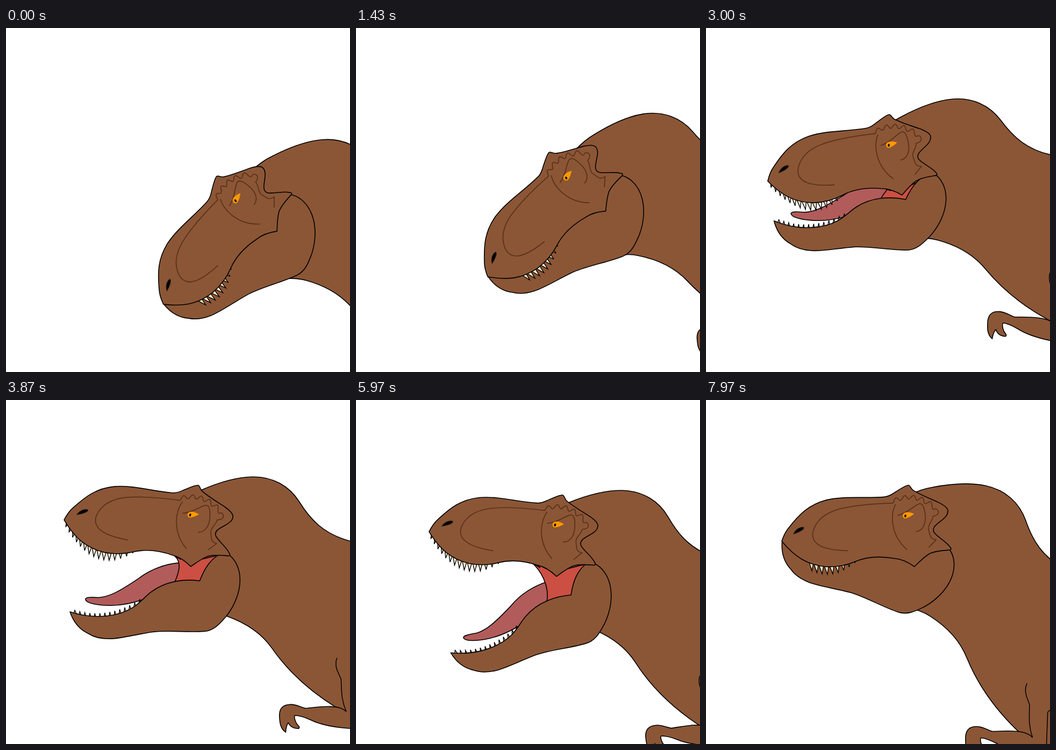
Animation of 640x640 px, one loop 8 s. Source, as an HTML page:

```html
<!DOCTYPE html>
<html lang="en">
<head>
<meta charset="utf-8">
<title>Roaring dinosaur</title>
<style>
html, body { margin: 0; width: 100%; height: 100%; overflow: hidden; background: #fff; }
svg { display: block; width: 100%; height: 100%; }
.skin { fill: #8b5636; stroke: #000; stroke-width: 1.6; stroke-linejoin: round; }
.ink { fill: none; stroke: #000; stroke-width: 1.5; }
.fold { fill: none; stroke: #59301a; stroke-width: 1.7; stroke-linejoin: round; }
.tooth { fill: #fdf0cf; stroke: #000; stroke-width: 1.4; }
.tongue { fill: #b25b5b; stroke: #000; stroke-width: 1.6; }
.throat { fill: #cc4f43; stroke: #000; stroke-width: 1.6; }
</style>
</head>
<body>
<svg viewBox="0 0 640 640">
  <g id="body">
    <path class="skin" d="M326,189C342,177 352,171 365,166C398,152 430,142 462,142C500,142 530,160 548,189
      C568,222 592,249 640,263C690,277 760,300 820,330L820,700L720,640C690,606 645,592 613,573
      C545,530 510,484 495,462C478,437 450,415 412,401C400,396 388,395 370,394Z"/>
    <g id="arm">
      <path class="skin" d="M636,581C628,574 618,573 606,573C590,573 575,576 560,578C550,576 542,571 531,572
        C518,573 512,580 512,592C513,605 514,617 525,624C525,617 526,611 529,606C533,613 540,617 549,616
        C552,612 547,611 544,606C541,601 539,594 541,592C550,592 560,595 570,599C590,608 615,611 640,612L740,616"/>
      <path class="ink" d="M615,482C612,490 613,500 619,511L624,521C626,545 626,560 636,581M666,524L659,531L664,600"/>
    </g>
    <g id="head">
      <path id="tongue" class="tongue" d="M325,301C300,303 272,312 250,329C215,352 195,363 175,364
        C160,363 150,363 150,367C151,374 172,379 198,379C225,379 248,373 275,362L330,340Z"/>
      <path id="throat" class="throat"/>
      <path id="front" class="tooth"/>
      <g id="jaw">
        <path id="lower" class="tooth"/>
        <path class="skin" d="M121,390C128,412 140,424 155,431C167,439 180,441 195,441C215,441 245,433 275,429
          C305,426 340,431 370,429C390,428 402,412 412,401C428,381 438,356 438,333C438,312 429,296 419,288
          L410,282C385,290 372,312 363,335C335,331 300,334 272,355C262,362 255,372 240,382C215,398 170,407 121,390Z"/>
      </g>
      <path id="back" class="tooth"/>
      <path class="skin" d="M111,223C117,211 121,206 128,200C150,180 170,164 205,160.5C240,158 275,169 312,172
        C322,173 328,169 335,166C345,162 358,156 361,158C364,160 363,163 367,168C378,178 395,188 410,198
        C420,205 426,212 425,217C424,224 418,228 409,233C398,239 391,243 393,251C396,260 412,271 418,283
        C420,287 421,288 417,289C405,288 390,286 378,290C366,295 357,302 347,309C336,298 325,291 313,288
        C290,280 265,276 240,282C220,287 200,286 185,283C150,274 130,255 111,223Z"/>
      <path class="fold" d="M327,186C290,181 255,178 225,181C200,184 180,195 171,215C163,238 185,252 230,260"/>
      <path class="fold" d="M331,189C318,205 312,245 339,276"/>
      <path class="fold" d="M331,210C350,209 362,198 374,195C382,194 383,205 382,220C380,238 370,246 360,245"/>
      <path class="fold" d="M404,209C411,216 406,222 396,222C394,231 384,236 384,244C385,258 384,263 395,266L379,278"/>
      <path id="crest" class="fold"/>
      <path fill="#f90" d="M342,209C346,205 355,207 362,212C357,215 350,218 344,218C340,216 340,212 342,209Z"/>
      <ellipse cx="345.5" cy="213.2" rx="1.8" ry="2.8" transform="rotate(20 345.5 213.2)"/>
      <path stroke="#000" stroke-opacity=".3" stroke-width="2" d="M135,213C140,205 150,202 155,204C157,207 148,211 135,213Z"/>
    </g>
  </g>
</svg>
<script>
const LOOP = 8000;
const CHEST = [527.5, 333.5], NECK = [351.5, 287.7], SHOULDER = [644, 486], HINGE = [410, 290];

// Key poses: time, chest x, chest y, tilt, nod, reach, gape, swing
const poses = [
  [0, 669, 393.5, -4.5, -48.3, 0, 31.6, 5],
  [730, 655, 377.5, -5, -46.2, 0.1, 31.6, 5],
  [2300, 586.5, 301, -13.8, -27.7, 0.6, 31.6, 16],
  [3450, 525, 329, -0.6, -0.9, 0, 6.5, 10],
  [5030, 539, 344, -0.8, 3, -0.5, -14, -20],
  [6830, 567, 372, 5.5, -10.5, -0.5, -7.75, 12.5],
  [7970, 544, 360.5, 12.2, -21.4, 1, 31.6, -6]];

const el = id => document.getElementById(id);
const set = (id, name, value) => el(id).setAttribute(name, value);

// Monotone cubic through the poses, at rest at both ends
function poseAt(t) {
  const last = poses.length - 1;
  t = Math.min(t, poses[last][0]);
  let i = 0;
  while (i < last - 1 && t >= poses[i + 1][0]) i++;
  const rate = (k, c) => (poses[k + 1][c] - poses[k][c]) / (poses[k + 1][0] - poses[k][0]);
  const slope = (k, c) => {
    if (k < 1 || k >= last) return 0;
    const a = rate(k - 1, c), b = rate(k, c);
    return a * b > 0 ? 2 * a * b / (a + b) : 0;
  };
  const span = poses[i + 1][0] - poses[i][0], u = (t - poses[i][0]) / span;
  return poses[i].map((v, c) => {
    const m = slope(i, c) * span, n = slope(i + 1, c) * span, w = poses[i + 1][c] - v;
    return v + u * (m + u * (3 * w - 2 * m - n + u * (m + n - 2 * w)));
  });
}

function tooth(x, y, dx, height, w) {
  return `M${x + dx - w},${y + height}L${x},${y}L${x + dx + w},${y + height}Z`;
}

// Teeth follow the curve of each lip and are longest in the middle
function drawTeeth() {
  const upper = Array.from({ length: 15 }, (_, i) => {
    const x = 114 + 6 * i + 0.21 * i * i, d = 195 - x, big = Math.sin(Math.PI * i / 15);
    const y = 298 - d * d * (0.0078 + 0.00002 * d);
    return tooth(x, y, 3.5 - i * 0.3, -9 - 7 * big, 2.2 + 2 * big);
  });
  set('front', 'd', upper.slice(0, 6).join(''));
  set('back', 'd', upper.slice(6).join(''));

  let lower = '';
  for (let i = 0; i < 14; i++) {
    const x = 130 + 9.3 * i, big = Math.sin(Math.PI * i / 14);
    lower += tooth(x, 395 - 0.0042 * (x - 173) ** 2 - 2 * big, 0.5, 8 + 9 * big, 3.2);
  }
  set('lower', 'd', lower);
}

// Bumps along the arc above the eye
function drawCrest() {
  let d = 'M327,186';
  const steps = 80;
  for (let i = 0; i <= steps; i++) {
    const u = i / steps, v = 1 - u, bump = 3.6 * Math.sin(u * Math.PI * 10);
    const x = v * v * 329 + 2 * u * v * 372 + u * u * 404 + bump * u * 0.8;
    const y = v * v * 182 + 2 * u * v * 170 + u * u * 209 - bump;
    d += `L${x.toFixed(1)},${y.toFixed(1)}`;
  }
  set('crest', 'd', d);
}

function draw(t) {
  const [, x, y, tilt, nod, reach, gape, swing] = poseAt(t);
  set('body', 'transform', `translate(${x} ${y}) rotate(${tilt}) translate(${-CHEST[0]} ${-CHEST[1]})`);
  set('arm', 'transform', `rotate(${swing} ${SHOULDER})`);
  set('head', 'transform', `translate(${9 * reach} ${8 * reach}) rotate(${nod} ${NECK})`);

  const turn = `rotate(${gape} ${HINGE})`;
  const lick = 2.5 * Math.sin((t - 3870) / 4000 * 2 * Math.PI);
  set('jaw', 'transform', turn);
  set('tongue', 'transform', `${turn} rotate(${lick} 330 330)`);

  const a = gape * Math.PI / 180, c = Math.cos(a), s = Math.sin(a);
  const onJaw = (px, py) => {
    const dx = px - HINGE[0], dy = py - HINGE[1];
    return [HINGE[0] + dx * c - dy * s, HINGE[1] + dx * s + dy * c];
  };
  const lip = 313 + Math.min(gape, 0);
  set('throat', 'd', `M${lip},${286 + (lip - 313) * 0.3}l16,10L${lip},280` +
    `M${lip},${286 + (lip - 313) * 0.3}C${lip + 16},296 ${onJaw(329, 310)} ${onJaw(316, 338)}` +
    `L${onJaw(363, 340)}L${onJaw(410, 285)}L347,300Z`);
}

drawTeeth();
drawCrest();
const start = performance.now();
function tick() {
  draw((performance.now() - start) % LOOP);
  requestAnimationFrame(tick);
}
tick();
</script>
</body>
</html>
```
